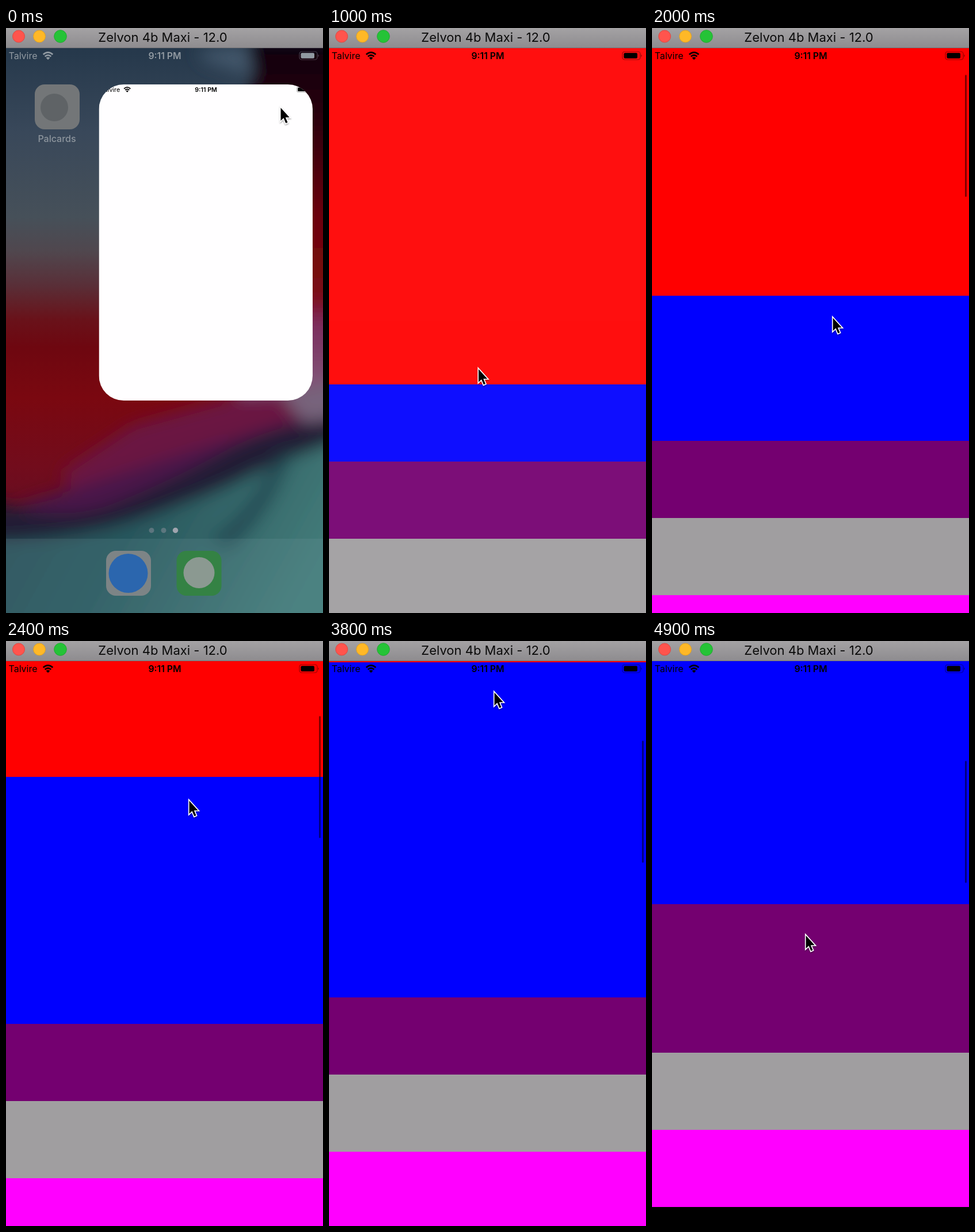
Animation, 551 px wide and 1016 px high, one loop 5000 ms. Source, as an HTML page:

```html
<!DOCTYPE html>
<html lang="en">
<head>
<meta charset="utf-8">
<style>
html, body { margin: 0; width: 100%; height: 100%; overflow: hidden; background: #000; }
svg { display: block; width: 551px; height: 1016px; }
text { font-family: Inter, "Open Sans", sans-serif; }
</style>
</head>
<body>
<svg viewBox="0 0 551 1016" xmlns="http://www.w3.org/2000/svg">
  <defs>
    <linearGradient id="bar" x2="0" y2="1">
      <stop stop-color="#a4a2a4"/><stop offset="1" stop-color="#8e8c8f"/>
    </linearGradient>
    <linearGradient id="sky" x2="0" y2="1">
      <stop stop-color="#25384b"/>
      <stop offset=".15" stop-color="#39485a"/>
      <stop offset=".3" stop-color="#465059"/>
      <stop offset=".36" stop-color="#50474e"/>
      <stop offset=".42" stop-color="#592f38"/>
      <stop offset=".48" stop-color="#69121a"/>
      <stop offset=".53" stop-color="#6e0710"/>
      <stop offset=".62" stop-color="#7a0810"/>
      <stop offset=".74" stop-color="#720c1c"/>
      <stop offset="1" stop-color="#4a1030"/>
    </linearGradient>
    <linearGradient id="side" x2="0" y2="1">
      <stop stop-color="#0c0508"/>
      <stop offset=".2" stop-color="#2a0408"/>
      <stop offset=".45" stop-color="#6c0409"/>
      <stop offset=".66" stop-color="#7c0a14"/>
      <stop offset=".72" stop-color="#7a2a5c"/>
      <stop offset="1" stop-color="#86708a"/>
    </linearGradient>
    <linearGradient id="sea" x2="1" y2=".3">
      <stop stop-color="#274652"/><stop offset=".5" stop-color="#28575d"/>
      <stop offset="1" stop-color="#437b79"/>
    </linearGradient>
    <filter id="soft" x="-30%" y="-30%" width="160%" height="160%"><feGaussianBlur stdDeviation="14"/></filter>
    <filter id="shade" x="-50%" y="-50%" width="200%" height="200%">
      <feDropShadow dx="0" dy="1.5" stdDeviation="1.3" flood-opacity=".4"/>
    </filter>
    <clipPath id="clip"><rect id="hole" width="551" height="982"/></clipPath>
    <g id="status">
      <text x="4.500" y="19.500" font-size="16">Talvire</text>
      <text x="276" y="19.500" font-size="15.800" font-weight="600" text-anchor="middle">9:11 PM</text>
      <g fill="none" stroke="currentColor" stroke-width="2.700">
        <path d="M64.700 11.600Q73 4 81.300 11.600M67.700 15Q73 10.400 78.300 15"/>
      </g>
      <path d="M73 20.800L69.600 17.300Q73 14.800 76.400 17.300Z"/>
      <rect x="510" y="6.500" width="31" height="14" rx="4" fill="none" stroke="currentColor" stroke-opacity=".4" stroke-width="1.200"/>
      <rect x="512.500" y="8.800" width="23.500" height="9.500" rx="2"/>
      <path d="M542.500 11.200Q545 13.500 542.500 15.800Z" opacity=".5"/>
    </g>
  </defs>

  <g id="home">
    <rect y="34" width="551" height="982" fill="url(#sky)"/>
    <g filter="url(#soft)">
      <path d="M420 20H600V700H390L440 400Z" fill="url(#side)"/>
      <path d="M330 40L420 30L430 85L350 60Z" fill="#43566a"/>
      <path d="M100 770L220 690L400 640L580 630V740L300 800L120 850Z" fill="#6b1242"/>
      <path d="M20 830Q220 765 350 725T580 660V740L130 890Z" fill="#481748"/>
      <path d="M480 640L600 600V700L520 685Z" fill="#77647c"/>
      <path d="M-40 815Q90 865 190 825T380 735T600 675V1060H-40Z" fill="#211f34"/>
      <path d="M-40 890Q120 890 240 850T420 780T600 710V1060H-40Z" fill="url(#sea)"/>
      <path d="M350 890Q430 830 470 740L500 730Q470 840 390 905Z" fill="#1c3c48" opacity=".6"/>
    </g>
    <rect y="887" width="551" height="129" fill="#7fa4aa" opacity=".16"/>
    <use href="#status" y="34.500" fill="#919aa2" color="#919aa2"/>
    <rect x="50" y="98" width="78" height="78" rx="17" fill="#737678"/>
    <circle cx="84" cy="138" r="24" fill="#5f6366"/>
    <text x="88.500" y="197.500" font-size="16" font-weight="500" text-anchor="middle" fill="#8d959d">Palcards</text>
    <rect x="174" y="908" width="78" height="78" rx="17" fill="#7d8486"/>
    <circle cx="212.500" cy="947" r="34" fill="#2b66ae"/>
    <rect x="296.500" y="908" width="78" height="78" rx="17" fill="#348244"/>
    <circle cx="335.500" cy="946" r="27" fill="#8b9991"/>
    <g fill="#858c98">
      <circle cx="253" cy="872.500" r="4.500" opacity=".55"/>
      <circle cx="274" cy="872.500" r="4.500" opacity=".55"/>
      <circle cx="294.500" cy="872.500" r="4.700" fill="#a0a4ae"/>
    </g>
    <rect id="dim" y="34" width="551" height="982" opacity="0"/>
  </g>

  <g id="card">
    <g clip-path="url(#clip)">
      <rect width="551" height="982" fill="#fffeff"/>
      <g id="list"></g>
      <use href="#status" y="-.5" fill="#000" color="#000"/>
      <rect id="thumb" x="544" width="3" height="212" rx="1.500"/>
    </g>
  </g>

  <rect width="551" height="34" fill="url(#bar)"/>
  <rect y="34" width="551" height="1" fill="#737174"/>
  <g stroke-width="1">
    <circle cx="22" cy="14.500" r="10.500" fill="#ff544d" stroke="#df4640"/>
    <circle cx="58" cy="14.500" r="10.500" fill="#ffb827" stroke="#dea023"/>
    <circle cx="94.500" cy="14.500" r="10.800" fill="#25c337" stroke="#20a930"/>
  </g>
  <text x="272.500" y="23.500" font-size="22" text-anchor="middle" fill="#0a0a0a">Zelvon 4b Maxi - 12.0</text>

  <path id="arrow" d="M2.500 4.500V27L7.500 22.300L11.300 31.300L14.500 29.900L10.800 21.200H17.700Z" fill="#000" stroke="#fff" stroke-width="3.200" paint-order="stroke" filter="url(#shade)"/>
</svg>
<script>
const LOOP = 5000, STEP = 100;
const TOP = 35, PAGE = 583.5, SMALL = 134;
const colors = ["#f00", "#00f", "#740070", "#a09ea0", "#f0f", "#000"];
const $ = id => document.getElementById(id);
const set = (el, attrs) => { for (const k in attrs) el.setAttribute(k, attrs[k]); };
const clamp = v => Math.min(1, Math.max(0, v));
const ramp = (t, a, b) => clamp((t - a) / (b - a));
const mix = (a, b, p) => a + (b - a) * p;

const bands = colors.map(fill => {
  const r = document.createElementNS("http://www.w3.org/2000/svg", "rect");
  set(r, { width: 551, fill });
  $("list").append(r);
  return r;
});

// time, x, y
const pointer = [
  [0, 475, 134], [200, 458, 165], [600, 300, 540], [800, 268, 602],
  [1000, 257.5, 588], [1200, 517, 54], [1300, 307, 682], [1700, 307, 682],
  [1800, 308, 640], [2000, 312, 499], [2400, 316, 273], [2900, 305, 150],
  [3500, 287, 88], [3800, 285, 85], [4100, 285, 85], [4600, 258, 719],
  [4700, 262, 698], [4800, 264, 610], [4900, 265, 507]
];
// time, scroll offset
const scroll = [
  [0, 0], [1700, 0], [1800, 14], [2000, 153.5], [2400, 382.5], [2900, 506],
  [3500, 568], [3800, 581.5], [4000, PAGE], [4700, PAGE], [4800, 650], [4900, 745]
];

// Monotone cubic through the keys
function curve(keys, col, t) {
  const last = keys.length - 1;
  if (t >= keys[last][0]) return keys[last][col];
  const slope = i => (keys[i + 1][col] - keys[i][col]) / (keys[i + 1][0] - keys[i][0]);
  const tangent = i => {
    if (i === 0 || i === last) return 0;
    const a = slope(i - 1), b = slope(i);
    return a * b > 0 ? 2 * a * b / (a + b) : 0;
  };
  let i = 0;
  while (t >= keys[i + 1][0]) i++;
  const d = keys[i + 1][0] - keys[i][0], u = (t - keys[i][0]) / d, v = 1 - u;
  return keys[i][col] * (1 + 2 * u) * v * v + keys[i + 1][col] * u * u * (3 - 2 * u)
    + d * u * v * (tangent(i) * v - tangent(i + 1) * u);
}

function drawCard(t) {
  const rest = t < 700 ? Math.exp(-t / 120) : 0;
  const k = mix(1, 371.5 / 551, rest);
  const x = mix(0, 161.5, rest), y = mix(TOP, 98, rest);
  const h = mix(982, 549, rest);
  set($("card"), { transform: `translate(${x} ${y}) scale(${k})` });
  set($("hole"), { height: h / k, rx: 43 * rest / k });
  set($("dim"), { opacity: 0.25 * (1 - rest) });
  $("home").style.display = rest ? "" : "none";
}

function drawList(t) {
  const s = curve(scroll, 1, t);
  const page = s / PAGE, top = Math.floor(page), part = page - top;
  let y = -part * PAGE;
  bands.forEach((band, i) => {
    const h = i <= top ? PAGE : i === top + 1 ? mix(SMALL, PAGE, part) : SMALL;
    const shown = i >= top;
    // whole pixels keep the seams crisp
    const from = Math.round(y), to = Math.round(y + h);
    set(band, { y: from, height: shown ? to - from : 0 });
    if (shown) y += h;
  });
  const fade = t < 900 ? 0 : t < 1000 ? 0.5 : t < 1100 ? 0.94 : 1;
  set($("list"), { opacity: fade });
  const seen = t < 1800 ? 0 : t < 4700 ? 1 - ramp(t, 4100, 4500) : ramp(t, 4700, 4800);
  set($("thumb"), { y: 13.2 + 0.2146 * s, opacity: 0.5 * seen });
}

function draw(now) {
  const t = Math.floor((now % LOOP) / STEP) * STEP;
  drawCard(t);
  drawList(t);
  set($("arrow"), { transform: `translate(${curve(pointer, 1, t)} ${curve(pointer, 2, t)})` });
}

let start = null;
function tick(now) {
  if (start === null) start = now;
  draw(now - start);
  requestAnimationFrame(tick);
}
draw(0);
requestAnimationFrame(tick);
</script>
</body>
</html>
```
